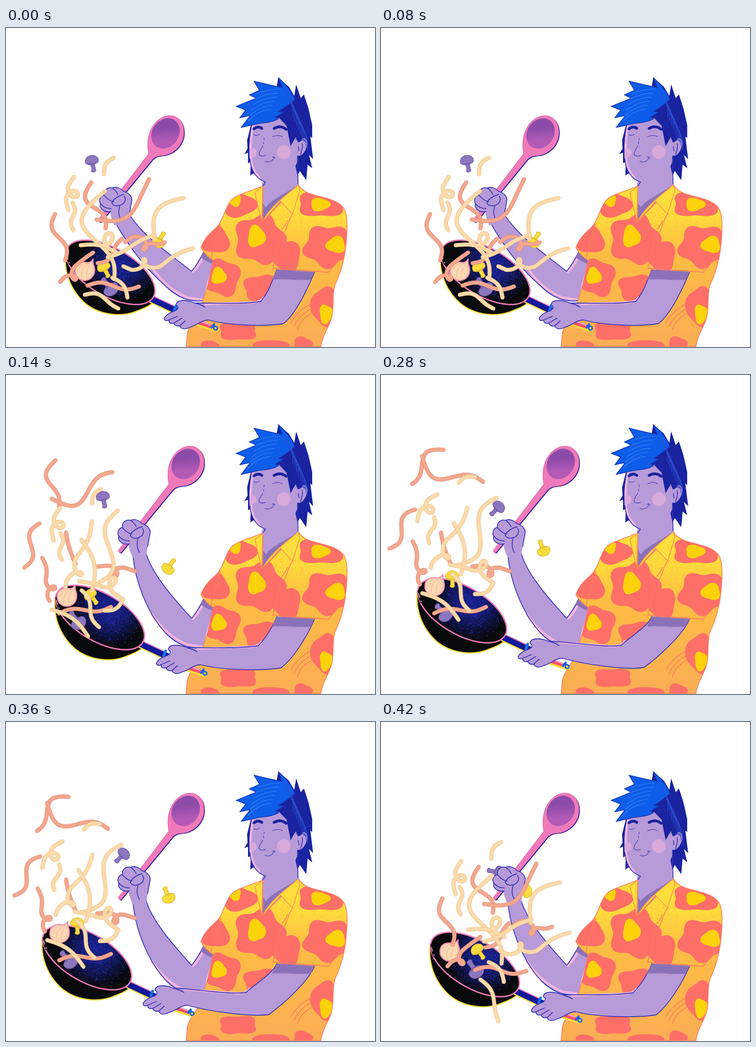
An HTML page for the animation above (0.56 s loop, 805 by 696 pixels).

```html
<!DOCTYPE html>
<html lang="en">
<head>
<meta charset="utf-8">
<title>Stir fry</title>
<style>
  html, body { margin: 0; width: 100%; height: 100%; overflow: hidden; background: #fff; }
  svg { display: block; width: 100%; height: 100%; }
  path, ellipse, circle { stroke-linecap: round; stroke-linejoin: round; }
  .skin { fill: #b79ad8; }
  .shade { fill: #8b72b8; }
  .ink { fill: none; stroke: #3435b5; stroke-width: 1.8; }
  .glow { fill: none; stroke: #f3b5df; stroke-width: 5; }
  .seam { fill: none; stroke: #fb7b62; stroke-width: 1.6; }
</style>
</head>
<body>
<svg viewBox="0 0 805 696">
  <defs>
    <linearGradient id="cloth" x1="0" y1="0" x2="0" y2="1">
      <stop offset="0" stop-color="#ffe23c"/><stop offset=".2" stop-color="#ffdb3c"/>
      <stop offset=".42" stop-color="#fdbd43"/><stop offset="1" stop-color="#fbad55"/>
    </linearGradient>
    <linearGradient id="bowl" x1="0" y1="0" x2="0" y2="1" gradientTransform="rotate(-35 .5 .5)">
      <stop offset=".3" stop-color="#8c4ba8"/><stop offset=".75" stop-color="#b25ab6"/>
    </linearGradient>
    <radialGradient id="deep" gradientUnits="userSpaceOnUse" cx="235" cy="505" r="85">
      <stop offset="0" stop-color="#181f88"/><stop offset=".4" stop-color="#141a6c"/><stop offset="1" stop-color="#08090b"/>
    </radialGradient>
    <path id="torso" d="M560 345C535 355 508 362 494 373C478 388 475 420 458 436C445 448 433 458 425 479Q436 498 452 507L440 560L429 597C420 630 396 648 395 671L393 695H687C690 671 704 655 711 630C716 603 711 580 718 560C735 525 741 490 743 458Q746 420 741 403C737 384 715 375 690 369C665 363 648 359 638 342L560 422Z"/>
    <path id="face" d="M538 206C531 236 530 265 532 288C534 312 548 331 566 336C600 337 628 318 636 290V200L590 190Z"/>
    <path id="ladle" d="M355 238C352 220 352 200 362 182C372 163 391 152 409 156C427 161 435 180 431 202C426 224 407 239 389 242C378 243 372 243 364 250L251 387Q246 390 245 383Z"/>
    <clipPath id="inShirt"><use href="#torso"/></clipPath>
    <clipPath id="inFace"><use href="#face"/></clipPath>
    <clipPath id="inPan"><ellipse cx="228" cy="533" rx="106" ry="50" transform="rotate(30 228 533)"/></clipPath>
  </defs>

  <g id="behind"></g>

  <g id="spoon">
    <use href="#ladle" fill="#2427a0" transform="translate(2 1.5)"/>
    <use href="#ladle" fill="#f07ab9" stroke="#d75aa2"/>
    <ellipse cx="392" cy="194" rx="29" ry="35" transform="rotate(35 392 194)" fill="url(#bowl)"/>
  </g>

  <path id="raised" class="skin"/>
  <path id="raisedGlow" class="glow"/>
  <path id="raisedInk" class="ink"/>
  <path class="shade" d="M430 488L453 505L450 514Q436 509 424 500Z"/>
  <g id="fist">
    <path class="skin" d="M276 398C270 382 266 374 269 368C255 372 243 362 246 352C240 341 249 333 254 333C252 322 262 314 272 317C280 313 291 318 296 324C309 328 317 337 314 347C313 365 307 378 306 398Z"/>
    <path class="ink" d="M269 368C255 372 243 362 246 352C240 341 249 333 254 333C252 322 262 314 272 317C280 313 291 318 296 324C309 328 317 337 314 347L309 374M254 333Q264 345 275 347M246 351Q254 362 269 362M272 317Q281 324 284 331M271 350C273 341 288 333 297 331M271 350C276 359 289 357 297 350Q303 342 298 335M288 357Q283 373 291 387"/>
  </g>

  <path class="skin" d="M558 340L565 325L636 292L638 348L560 424Z"/>
  <path class="shade" d="M637 342L636 357C608 370 585 388 559 424L557 378L567 391C578 374 612 361 637 342Z"/>

  <use href="#torso" fill="url(#cloth)"/>
  <g clip-path="url(#inShirt)">
    <path id="grain" fill="none" stroke="#fdb53f" stroke-width="1.2"/>
    <path id="petals" fill="#fe6f68"/>
    <path id="yolks" fill="#fcd20b"/>
    <path class="seam" d="M475 402C462 423 466 447 456 466L447 503M468 428L464 465M626 405C610 426 616 444 598 455Q593 480 582 524L703 533L737 492M614 420Q609 433 602 439"/>
    <path id="folds" class="seam"/>
  </g>
  <use href="#torso" class="seam"/>
  <path d="M560 345L543 359L558 422ZM638 342L641 355L625 406L599 378L559 423C575 390 609 366 638 342Z" fill="#ffdd3c" stroke="#fb8a55" stroke-width="1.5"/>

  <g fill="#1a23a0">
    <path d="M536 205L526 245L527 263L520 275L528 272V295L534 292L533 322L540 317L565 337L560 230Z"/>
    <path d="M594 108L617 128L629 148L633 123L643 153L650 145L660 176L668 212V240L664 237L670 286L661 277L668 306L658 298L655 332L641 312L636 322L620 250L580 190Z"/>
    <use href="#face" class="skin"/>
    <g clip-path="url(#inFace)">
      <path d="M536 207C531 236 530 265 532 288Q535 312 550 327" stroke="#efb8e1" stroke-width="10" fill="none"/>
      <circle cx="537" cy="272" r="10" fill="#d9a9da"/><circle cx="606" cy="271" r="15" fill="#d9a9da"/>
      <path d="M536 206L590 193L615 217L621 242L637 246V190Z" fill="#a386cb"/>
    </g>
    <path class="skin" d="M634 252C643 235 659 236 657 254C654 271 643 284 633 277Z"/>
    <path class="ink" d="M532 285C534 312 548 331 566 336L561 344M636 280L637 340M640 248Q651 239 654 250M646 252C649 263 644 266 643 276M638 259L639 268"/>
    <path fill="none" stroke="#1a23a0" stroke-width="6" d="M541 220Q550 213 558 219M585 219Q599 211 611 221"/>
    <path class="ink" style="stroke-width:1.5;stroke:#5149bb" d="M541 233Q547 236 553 232M582 237Q594 232 603 237M563 240V244M562 249V253M560 258C554 268 549 275 554 278Q560 281 566 278M565 291Q579 296 585 282M581 282Q585 280 587 284"/>
    <path d="M572 204L596 196L612 213L621 258L632 238L637 250L649 240L660 205L635 160L600 120Z"/>
    <path fill="#0d5de9" stroke="#1837b7" stroke-width="1.5" d="M502 171L546 153L531 146L553 136L541 116L575 124L603 130L594 108C608 121 624 138 630 156C616 168 606 176 594 182L606 184L588 194L594 198C578 208 556 206 540 211L513 217L533 191L510 196L523 179Z"/>
    <path id="shine" fill="none" stroke="#428df8" stroke-width="1.2"/>
    <path id="sheen" fill="none" stroke="#2a50d0" stroke-width="1.2"/>
  </g>

  <g id="pan">
    <path fill="#08090b" stroke="#f8dc35" stroke-width="2.5" d="M130 491C126 530 139 570 172 600C205 628 255 632 290 616Q316 606 323 597L300 540Z"/>
    <path d="M317 594L424 645" stroke="#f8dc35" stroke-width="13"/>
    <path d="M316 590L424 641" stroke="#12189a" stroke-width="14"/>
    <path d="M319 584L372 609" stroke="#ef78b8" stroke-width="2"/>
    <path d="M371 606L367 617" stroke="#1672ef" stroke-width="6"/>
    <path d="M412 643L456 657" stroke="#f8dc35" stroke-width="11"/>
    <path d="M412 640L449 652" stroke="#f4506c" stroke-width="8"/>
    <path d="M423 639L446 648" stroke="#f49cc8" stroke-width="3"/>
    <path d="M448 654L454 646L455 655" fill="none" stroke="#1464e8" stroke-width="4"/>
    <circle cx="457" cy="655" r="4" fill="#f8dc35" stroke="#1464e8" stroke-width="3"/>
    <ellipse cx="228" cy="533" rx="108" ry="52" transform="rotate(30 228 533)" fill="url(#deep)" stroke="#f07ab9" stroke-width="3"/>
    <path id="sparks" clip-path="url(#inPan)" fill="none" stroke="#2632c0" stroke-width="1.3"/>
    <path d="M133 490Q133 502 139 515" stroke="#08090b" stroke-width="4" fill="none"/>
    <path d="M133 496L135 504M138 512L139 513" stroke="#f49cc8" stroke-width="2"/>
  </g>

  <g id="food"></g>

  <path id="lower" class="skin"/>
  <path id="lowerGlow" class="glow"/>
  <path id="lowerInk" class="ink"/>
  <g id="hand">
    <path class="skin" d="M416 600C398 594 373 590 371 604C382 611 370 617 364 619C354 622 342 632 346 637Q350 640 355 637Q355 646 366 644Q370 652 379 650C383 659 394 657 401 653C418 648 427 637 446 637Z"/>
    <path class="ink" d="M412 600C398 594 373 590 371 604C382 611 370 617 364 619C354 622 342 632 346 637Q350 640 355 637Q355 646 366 644Q370 652 379 650C383 659 394 657 401 653C418 648 427 637 442 637M355 637L374 629M366 644L384 633M379 650L391 639M412 600Q425 603 434 609"/>
  </g>
  <path class="shade" d="M591 527L673 532L665 549C640 552 610 546 580 549Z"/>
  <path class="seam" d="M582 524L703 533"/>
</svg>
<script>
const $ = id => document.getElementById(id);
const set = (id, d) => $(id).setAttribute('d', d);
const move = (id, x, y) => $(id).setAttribute('transform', `translate(${x} ${y})`);
const range = (n, fn) => Array.from({ length: n }, (_, i) => fn(i));
const { PI, sin, cos, hypot } = Math;
const clamp = v => Math.min(1, Math.max(0, v));
const polyline = pts => 'M' + pts.map(p => p.map(v => v.toFixed(1))).join('L');

// Grain on the shirt and in the pan
let seed = 7;
const rnd = () => (seed = seed * 16807 % 2147483647) / 2147483647;
const spread = (mid, size) => mid + (rnd() + rnd() - 1) * size;
const specks = (n, x, y, w, h) => range(n, () => `M${spread(x, w).toFixed(1)} ${spread(y, h).toFixed(1)}h.3`).join('');
set('grain', specks(900, 590, 405, 190, 60));
set('sparks', specks(1000, 248, 525, 80, 75));

// Hair strands and cloth folds
set('shine', range(6, i => `M${598 - i * 4} ${133 + i * 9}q-25 0 -50 ${10 + i * 3}`).join(''));
set('sheen', range(9, i => `M${606 + i * 4} ${132 + i * 9}q22 26 20 62`).join(''));
set('folds', range(3, i => `M${665 + i * 5} ${602 + i * 8}Q${636 + i * 3} ${618 + i * 8} ${622 + i * 7} ${642 + i * 8}`).join(''));

// Wavy-edged blobs make the flower print
const blob = (x, y, rx, ry, lobes, turn = 0) => polyline(range(48, i => {
  const a = i * PI / 24, r = 0.95 + 0.12 * cos(lobes * a + turn);
  return [x + rx * r * cos(a), y + ry * r * sin(a)];
})) + 'Z';
const flowers = [
  [509, 386, 38, 28, 3], [553, 461, 56, 55, 5], [457, 463, 32, 31, 3], [473, 545, 39, 42, 4],
  [688, 384, 54, 30, 4], [702, 476, 54, 47, 5], [612, 499, 33, 36, 3], [557, 567, 41, 30, 4],
  [694, 607, 29, 45, 3], [506, 661, 44, 22, 4], [445, 692, 20, 11, 2], [578, 692, 38, 13, 2], [647, 688, 21, 15, 3]
];
set('petals', flowers.map(f => blob(...f, f[0])).join(''));
set('yolks', [
  [499, 376, 15, 14], [546, 455, 20, 25], [464, 541, 17, 19], [685, 385, 22, 15], [720, 473, 22, 19], [698, 624, 15, 22]
].map(f => blob(...f, 3, f[0])).join(''));

const CREAM = ['#fbdaa8', '#dfb27f'], PINK = ['#f4a78d', '#cf7e6c'];
const YELLOW = ['#f7dc3e', '#d9a92c'], PURPLE = ['#8c76bd', '#6650a3'];

// A noodle runs from a to b, bowed and waved sideways, with an optional loop on its way
function noodle([fill, edge], a, b, { bow = 0, wave = 0, loop = 0, at = 0.5 }) {
  const dx = b[0] - a[0], dy = b[1] - a[1], len = hypot(dx, dy);
  const d = polyline(range(61, i => {
    const t = i / 60, u = clamp((t - at) / 0.4 + 0.5), turn = 2 * PI * u;
    const along = t * len + Math.abs(loop) * sin(turn);
    const side = bow * sin(PI * t) + wave * sin(2 * PI * t) + loop * (1 - cos(turn));
    return [a[0] + (dx * along - dy * side) / len, a[1] + (dy * along + dx * side) / len];
  }));
  const mid = [a[0] + dx / 2, a[1] + dy / 2];
  const body = `<path d="${d}" fill="none" stroke="${edge}" stroke-width="9"/>` +
    `<path d="${d}" fill="none" stroke="${fill}" stroke-width="7.8"/>`;
  return { mid, body };
}
const cream = (a, b, shape = {}) => noodle(CREAM, a, b, shape);
const pink = (a, b, shape = {}) => noodle(PINK, a, b, shape);

const shift = (x, y, body) => `<g transform="translate(${x} ${y})">${body}</g>`;
const draw = list => list.map(n => n.body).join('');
// The higher a noodle flies, the further it spins
const drift = (x, y, list) => shift(x, y, list.map(({ mid, body }) =>
  `<g transform="rotate(${47 * clamp((430 - mid[1]) / 190)} ${mid})">${body}</g>`).join(''));

// Cap at (x, y); the stem points along the angle, 90 being straight down
const mushroom = ([fill, edge], x, y, angle, size = 1) =>
  `<g transform="translate(${x} ${y}) rotate(${angle - 90}) scale(${size})" fill="${fill}" stroke="${edge}">
    <path d="M-4 4L-3 18Q-7 24 0 25Q8 24 5 18L5 4Z"/>
    <path d="M-14 3C-16 -7 -7 -13 2 -12C12 -11 17 -3 14 4C7 10 -9 10 -14 3Z"/>
    <path d="M-8 5Q0 8 8 5" fill="none"/></g>`;

const garlic = (x, y) => shift(x, y,
  `<path d="M-21 -3C-19 -17 -5 -20 7 -17Q14 -18 18 -25Q17 -15 20 -10C25 8 15 21 0 22C-15 21 -23 10 -21 -3Z" fill="#fbd8b1" stroke="#ef8cac" stroke-width="2.5"/>
   <path d="M12 -16C-4 -10 -10 2 -6 17M14 -14C4 -4 2 8 5 18M8 -17Q-11 -14 -15 0M17 -10Q18 6 13 13" fill="none" stroke="#f3ae9f"/>`);

const tossed = draw([
  pink([186, 337], [217, 437], { bow: 12, wave: 14 }),
  pink([198, 418], [312, 330], { bow: 34, wave: 6 }),
  pink([107, 406], [129, 507], { bow: 3, wave: 11 }),
  pink([260, 467], [346, 468], { bow: -6, wave: -8, loop: 11 }),
  pink([118, 554], [190, 490], { bow: -4, loop: 11, at: 0.3 }),
  pink([200, 513], [253, 460], { bow: 8, wave: 5 }),
  pink([178, 562], [290, 564], { wave: -7 }),
  cream([214, 319], [235, 283], { bow: -8 }),
  cream([148, 325], [136, 397], { bow: 11, loop: -13 }),
  cream([145, 381], [147, 441], { wave: -5 }),
  cream([216, 356], [236, 548], { bow: 40, wave: 26 }),
  cream([163, 474], [242, 490], { bow: -8, loop: -16, at: 0.7 })
]);
const swung = draw([
  cream([387, 371], [324, 460], { bow: 31 }),
  cream([325, 452], [222, 500], { wave: 3 }),
  cream([408, 481], [256, 520], { bow: -20, wave: 10, loop: 15, at: 0.7 }),
  cream([232, 545], [265, 588], { bow: -9 })
]);
const flung = [
  pink([108, 186], [116, 287], { bow: 16, wave: 11 }),
  pink([100, 270], [232, 212], { bow: 22, wave: 17 }),
  pink([73, 324], [40, 420], { bow: 2, wave: 12 }),
  pink([79, 399], [95, 493], { wave: -5, loop: -11, at: 0.72 }),
  cream([188, 281], [207, 249], { bow: -7 }),
  cream([118, 290], [104, 361], { bow: 11, loop: -13 }),
  cream([119, 346], [122, 403], { wave: -5 }),
  cream([244, 296], [190, 460], { bow: -10, wave: 22 }),
  cream([187, 320], [130, 462], { wave: -7, loop: -15, at: 0.75 }),
  cream([165, 360], [188, 470], { bow: -16 }),
  cream([160, 450], [255, 490], { bow: -8, loop: -15, at: 0.65 }),
  cream([255, 490], [215, 514], { bow: -9 }),
  cream([165, 470], [203, 550], { wave: -6 }),
  cream([100, 512], [179, 570], { bow: -11 })
];
const steady = draw([
  pink([131, 344], [152, 412], { bow: 3 }),
  pink([199, 418], [281, 428], { bow: -6, loop: 11 }),
  pink([116, 520], [229, 506], { wave: -6 })
]);

// The pan's reach drives the hand and elbow
const scenes = [
  {
    pan: [0, 0], hand: [0, 0], elbow: [0, 0], raised: false,
    food: mushroom(PURPLE, 187, 290, 80) + mushroom(YELLOW, 333, 467, -58) + garlic(172, 529) +
      mushroom(YELLOW, 213, 522, 65) + mushroom(PURPLE, 229, 569, 232, 1.2) + tossed + swung +
      draw([cream([172, 582], [245, 612], { bow: -10, wave: -4 })])
  },
  {
    pan: [-23, -4], hand: [-17, -5], elbow: [-5, -6], raised: true,
    food: mushroom(PURPLE, 211, 266, 80) + mushroom(YELLOW, 354, 422, -55) + garlic(133, 483) +
      mushroom(YELLOW, 184, 480, 55) + mushroom(PURPLE, 158, 540, 235, 1.2) + steady + draw(flung)
  },
  {
    pan: [-51, -19], hand: [-46, -19], elbow: [-31, -7], raised: true,
    food: mushroom(PURPLE, 256, 288, 135) + mushroom(YELLOW, 355, 383, -110) + garlic(117, 460) +
      mushroom(YELLOW, 155, 439, 90) + mushroom(PURPLE, 141, 522, 226, 1.2) + steady + drift(-10, -36, flung)
  },
  {
    pan: [-23, -4], hand: [-17, -5], elbow: [-5, -6], raised: true,
    behind: mushroom(PURPLE, 256, 328, 194) + mushroom(YELLOW, 317, 369, 180),
    food: garlic(150, 500) + mushroom(YELLOW, 210, 497, 55) + mushroom(PURPLE, 208, 544, 236, 1.2) +
      shift(27, -21, tossed) + shift(3, -21, swung) +
      draw([cream([217, 562], [256, 653], { bow: -10, wave: -4 })])
  }
];

const offset = ([dx, dy]) => (x, y) => `${x + dx} ${y + dy}`;

function poseLower({ hand, elbow }) {
  const h = offset(hand), e = offset(elbow);
  const top = `M591 527C581 550 ${e(572, 580)} ${e(555, 597)}C${e(512, 603)} ${h(460, 600)} ${h(412, 600)}`;
  const under = `${h(442, 637)}C${h(484, 649)} ${e(565, 652)} ${e(605, 645)}C${e(632, 625)} 657 570 673 533`;
  set('lower', `${top}L${under}Z`);
  set('lowerGlow', `M${e(562, 588)}Q${e(558, 598)} ${e(535, 599)}L${h(435, 602)}`);
  set('lowerInk', `${top}M${under}`);
  move('hand', ...hand);
}

function poseRaised(up) {
  const outer = (up ? 'M276 375C277 440 306 518 349 564' : 'M234 417C264 470 298 519 345 560') + 'C375 590 400 598 430 595';
  const inner = 'L431 489Q419 513 405 531' + (up ? 'C372 494 320 438 306 390' : 'C340 480 302 455 271 410');
  set('raised', outer + 'L438 560L453 506' + inner + 'Z');
  set('raisedGlow', 'M318 522Q351 570 395 588L428 593M408 532Q422 518 432 496');
  set('raisedInk', outer + inner.replace('L', 'M'));
  move('spoon', up ? 0 : -44, up ? 0 : 36);
  move('fist', up ? 0 : -40, up ? 0 : 32);
}

let shown = -1;
function show(i) {
  if (i === shown) return;
  shown = i;
  const scene = scenes[i];
  move('pan', ...scene.pan);
  $('behind').innerHTML = scene.behind || '';
  $('food').innerHTML = scene.food;
  poseRaised(scene.raised);
  poseLower(scene);
}

const start = performance.now();
function tick() {
  show(Math.floor((performance.now() - start) / 140) % scenes.length);
  requestAnimationFrame(tick);
}
tick();
</script>
</body>
</html>
```
